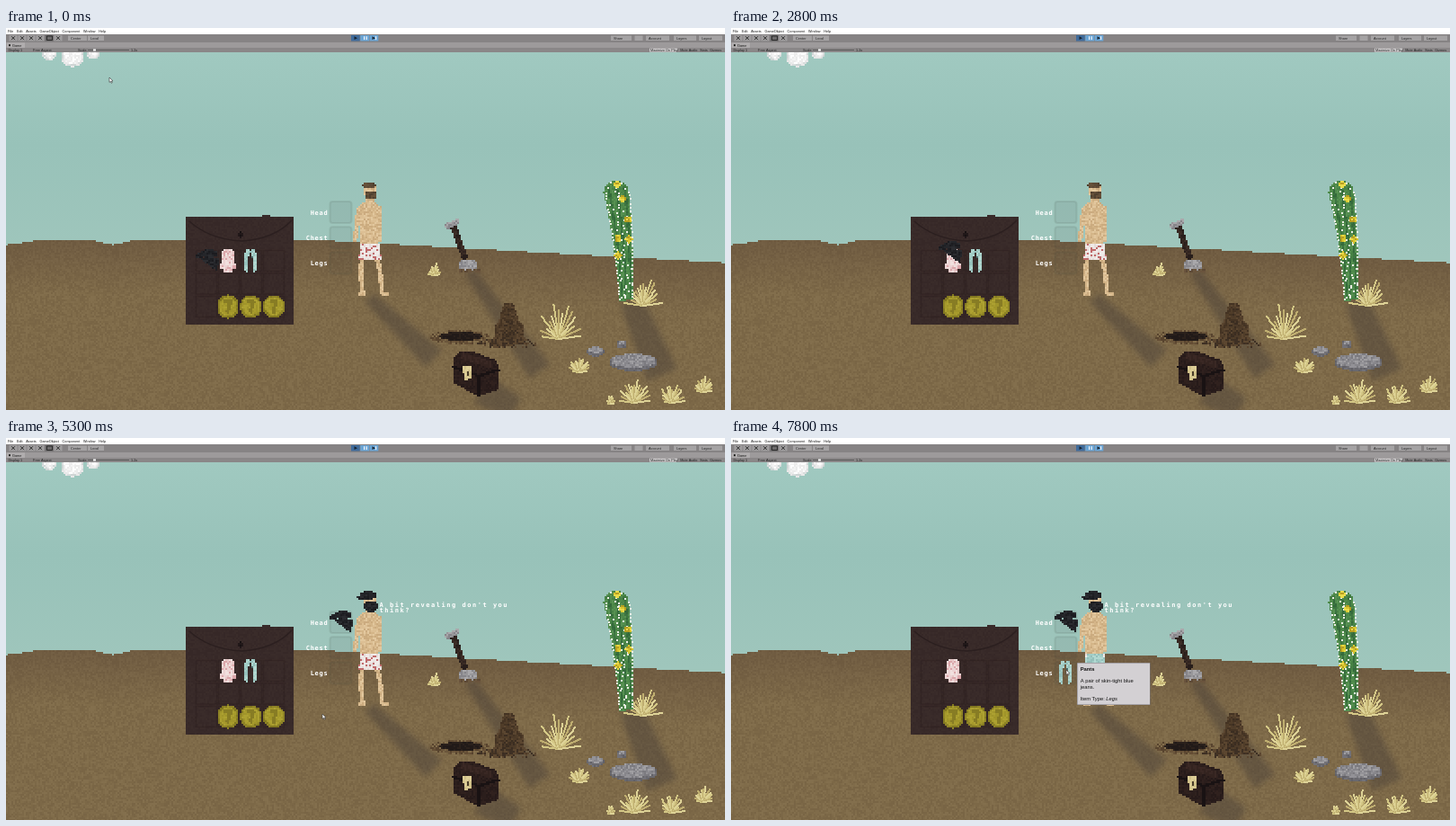
Animation, 800 px wide and 425 px high, one loop 8 s. Source, as an HTML page with a canvas:

```html
<!DOCTYPE html>
<html lang="en">
<head>
<meta charset="utf-8">
<title>Desert inventory</title>
<style>
html, body { margin: 0; width: 100%; height: 100%; overflow: hidden; background: #7e6a49; }
canvas { display: block; width: 100vw; height: 100vh; }
</style>
</head>
<body>
<canvas id="stage" width="800" height="425"></canvas>
<script>
const W = 800, H = 425, LOOP = 8000;
const SANS = '"Liberation Sans", Arial, sans-serif';
const MONO = '"DejaVu Sans Mono", monospace';
const stage = document.getElementById('stage').getContext('2d');

let seed = 7;
const rnd = () => (seed = (seed * 16807) % 2147483647) / 2147483647;
const pick = list => list[Math.floor(rnd() * list.length)];

function picture(paint, w = W, h = H) {
  const canvas = document.createElement('canvas');
  canvas.width = w;
  canvas.height = h;
  paint(canvas.getContext('2d'));
  return canvas;
}

function rect(c, color, x, y, w, h) {
  c.fillStyle = color;
  c.fillRect(x, y, w, h);
}

function text(c, str, x, y, font, color, align = 'left', spacing = 0) {
  c.font = font;
  c.fillStyle = color;
  c.textAlign = align;
  c.letterSpacing = spacing + 'px';
  c.fillText(str, x, y);
}

function oval(x, y, a, b) {
  const p = a * 0.55, q = b * 0.55;
  return `M${x - a} ${y}C${x - a} ${y - q} ${x - p} ${y - b} ${x} ${y - b}` +
    `C${x + p} ${y - b} ${x + a} ${y - q} ${x + a} ${y}` +
    `C${x + a} ${y + q} ${x + p} ${y + b} ${x} ${y + b}` +
    `C${x - p} ${y + b} ${x - a} ${y + q} ${x - a} ${y}Z`;
}

// A tapered strip between two points, bowed sideways by bend.
function band(x0, y0, x1, y1, w0, w1 = w0, bend = 0) {
  const len = Math.hypot(x1 - x0, y1 - y0), nx = (y0 - y1) / len, ny = (x1 - x0) / len;
  const at = (x, y, off) => `${(x + nx * off).toFixed(1)} ${(y + ny * off).toFixed(1)}`;
  const mid = off => at((x0 + x1) / 2, (y0 + y1) / 2, bend * 2 + off);
  const w = (w0 + w1) / 4;
  return `M${at(x0, y0, w0 / 2)}Q${mid(w)} ${at(x1, y1, w1 / 2)}` +
    `L${at(x1, y1, -w1 / 2)}Q${mid(-w)} ${at(x0, y0, -w0 / 2)}Z`;
}

// Fills a path with square cells of randomly chosen shades.
function art(c, path, shades, density = 1) {
  const cell = 2, tones = shades.split(' '), shape = new Path2D(path);
  const nums = path.match(/-?[\d.]+/g).map(Number);
  const xs = nums.filter((_, i) => i % 2 === 0), ys = nums.filter((_, i) => i % 2);
  const snap = v => Math.floor(v / cell) * cell;
  for (let y = snap(Math.min(...ys)); y < Math.max(...ys); y += cell)
    for (let x = snap(Math.min(...xs)); x < Math.max(...xs); x += cell)
      if (c.isPointInPath(shape, x + 1, y + 1) && rnd() < density)
        rect(c, pick(tones), x, y, cell, cell);
}

const SKIN = '#dcbf94 #d4b588 #e2c79e #cbab7f';
const DARK = '#1f2024 #25262a #1b1b1f #2b2c30';
const DENIM = '#a2cdc6 #b2d8d1 #94bfba';
const HAIR = '#5b4936 #665039 #50402f';
const STEEL = '#98979a #a9a8ab #86858a';
const SOIL = '#503d29 #5b4630 #443323';
const WOOD = '#2b1e1c #30211e #261a19';

function drawSky(c) {
  const g = c.createLinearGradient(0, 27, 0, 255);
  g.addColorStop(0, '#a0c9c0');
  g.addColorStop(.45, '#98c2b9');
  g.addColorStop(1, '#9fc6bc');
  rect(c, g, 0, 0, W, H);
  for (const [x, r] of [[48, 8], [74, 13], [97, 7]]) {
    art(c, oval(x, 25 + r * .5, r, r * .9), '#d9dddd #e8e8e8 #cfd5d5');
    art(c, oval(x, 24 + r * .5, r - 2, r * .9 - 2), '#f4f4f4 #ffffff #ececec');
  }
}

function horizon(x) {
  const bump = (at, width) => Math.exp(-(((x - at) / width) ** 2));
  return 235 + 6 * bump(0, 28) + 6 * bump(118, 18) + Math.max(0, x - 330) * .056;
}

function drawGround(c) {
  const tones = ['#806c4a', '#7c6847', '#836f4d', '#796545'];
  for (let x = 0; x < W; x += 2) {
    const top = Math.round(horizon(x) / 2) * 2;
    for (let y = top; y < H; y += 2) rect(c, pick(tones), x, y, 2, 2);
    const g = c.createLinearGradient(0, top, 0, top + 60);
    g.addColorStop(0, 'rgba(85,65,52,.35)');
    g.addColorStop(1, 'rgba(85,65,52,0)');
    rect(c, g, x, top, 2, 60);
  }
  c.filter = 'blur(3px)';
  c.fillStyle = 'rgba(72,62,56,.45)';
  for (const p of [
    band(404, 300, 476, 368, 14, 26),
    band(516, 271, 594, 382, 12, 28),
    band(696, 304, 730, 386, 26, 36),
    band(530, 402, 566, 424, 34, 28)
  ]) c.fill(new Path2D(p));
  c.filter = 'none';
}

function tuft(c, x, y, r) {
  for (let i = 0; i < 15; i++) {
    const a = Math.PI * (1.03 + i / 14 * .94), len = r * (.55 + rnd() * .45);
    c.fillStyle = ['#d4c886', '#bfae70', '#ded397'][i % 3];
    for (let d = 0; d < len; d += 1.7)
      c.fillRect(Math.round(x + Math.cos(a) * d * .68), Math.round(y + Math.sin(a) * d), 2, 2);
  }
}

function drawCactus(c) {
  art(c, oval(679, 183, 14, 13), '#4f8a4b #478245 #579152');
  art(c, band(679, 182, 690, 303, 28, 14, -2), '#4f8a4b #478245 #579152');
  for (const side of [-.5, 0, .5])
    art(c, band(679 + side * 18, 176, 690 + side * 9, 300, 3, 2, -2), '#346a3b #3d7541');
  for (let k = 0; k < 1; k += .035) {
    const mid = 679 + 11 * k + 8 * k * (1 - k), half = (14 - 7 * k) * Math.min(1, .45 + k * 7);
    for (const u of [-1, rnd() - .8, rnd() - .2, 1])
      rect(c, '#eceee4', Math.round(mid + u * half - 1), Math.round(171 + k * 130 + rnd() * 3), 2, 2);
  }
  for (const [x, y] of [[680, 174], [686, 190], [692, 213], [681, 234], [681, 253], [693, 235]])
    art(c, oval(x, y, 4, 4), '#d8c52c #eadb4a #b79f22');
}

function drawChest(c) {
  art(c, 'M497 368L505 360 516 359 544 369 549 378 548 402 526 410 498 395Z', WOOD);
  art(c, band(507, 364, 540, 375, 7), '#3a2824 #33231f');
  for (const p of [band(497, 377, 526, 387, 3), band(526, 387, 549, 380, 3), band(526, 387, 526, 409, 3)])
    art(c, p, '#191213');
  art(c, band(513, 376, 514, 391, 9), '#cfc088 #dccd96');
  rect(c, '#4a3d2a', 513, 382, 2, 5);
}

function drawProps(c) {
  art(c, band(498, 221, 511, 257, 7), '#30241f #3b2c25 #281e1b');
  art(c, band(489, 221, 504, 215, 7, 6), STEEL);
  art(c, oval(514, 264, 11, 7), STEEL);
  art(c, band(504, 271, 528, 269, 4), '#5d4936 #6a543d', .7);

  art(c, oval(505, 344, 33, 8), '#57432e #654e35 #6b563b', .7);
  art(c, oval(506, 343, 24, 5), '#211a18 #2b211c');
  art(c, band(559, 306, 560, 353, 10, 40, 0), SOIL);
  art(c, oval(560, 338, 17, 16), SOIL);
  art(c, band(561, 313, 561, 352, 4, 22), '#3b2d21 #4c3a28', .5);
  art(c, oval(558, 351, 33, 6), '#3e3024 #5c4730', .6);
  drawChest(c);

  for (const [x, y, a] of [[656, 359, 10], [685, 351, 6], [698, 371, 27]]) {
    const b = 3 + a * .25;
    art(c, oval(x, y + 1, a, b), '#6a696e #737278 #626167');
    art(c, oval(x, y - 1, a - 2, b - 2), '#87868b #939297 #7c7b80 #a09fa2');
  }

  tuft(c, 708, 308, 31);
  drawCactus(c);
  for (const [x, y, r] of [[476, 274, 14], [614, 345, 40], [637, 382, 18], [698, 416, 29], [740, 416, 23], [775, 404, 18], [672, 417, 9]])
    tuft(c, x, y, r);
}

function drawBag(c) {
  art(c, band(260, 210, 260, 329, 119, 121), '#382a29 #3a2c2a #362827');
  rect(c, '#382a29', 285, 208, 9, 3);
  c.strokeStyle = '#2b1f1f';
  c.lineWidth = 1.5;
  c.stroke(new Path2D('M204 215Q226 235 262 237Q298 235 318 214'));
  c.strokeStyle = 'rgba(22,14,15,.18)';
  for (let i = 0; i < 12; i++)
    c.strokeRect(211.5 + i % 4 * 25, 247.5 + Math.floor(i / 4) * 25.5, 23, 23);
  art(c, oval(261, 230, 3, 4), '#171112 #211819');
  for (const x of [247, 272.5, 298]) {
    art(c, oval(x, 310, 12, 13), '#827820 #8f8426');
    art(c, oval(x, 309.5, 10, 10.5), '#a79b2c #ada131 #a0942a');
    art(c, band(x - 4, 304, x + 4, 304, 4), '#877c24');
    art(c, band(x + 3, 304, x - 1, 317, 4), '#877c24');
  }
}

function drawSlots(c) {
  ['Head', 'Chest', 'Legs'].forEach((name, i) => {
    const dy = i * 28.3;
    c.beginPath();
    c.roundRect(360.5, 193 + dy, 24, 24, 3);
    c.fillStyle = 'rgba(60,70,65,.08)';
    c.fill();
    c.lineWidth = 2;
    c.strokeStyle = 'rgba(60,70,65,.11)';
    c.stroke();
    text(c, name, 358.5, 207.6 + dy, `bold 7px ${MONO}`, '#fff', 'right', .75);
  });
}

function drawEditor(c) {
  const row = (labels, x, y, gap, color = '#222') => {
    for (const s of labels) {
      text(c, s, x, y, `3.8px ${SANS}`, color);
      x += c.measureText(s).width + gap;
    }
  };
  const button = (s, x, w) => {
    rect(c, '#a5a3a4', x, 8.5, w, 5.5);
    row([s], x + 3, 12.8, 0);
  };
  rect(c, '#fff', 0, 0, W, 7);
  rect(c, '#868384', 0, 7, W, 9);
  rect(c, '#9d9a9b', 0, 16, W, 6);
  rect(c, '#8a8788', 0, 22, W, 5);
  row(['File', 'Edit', 'Assets', 'GameObject', 'Component', 'Window', 'Help'], 2, 4.5, 3.8, '#111');

  c.strokeStyle = '#222';
  c.lineWidth = .9;
  for (let x = 8; x < 60; x += 10) {
    rect(c, x === 48 ? '#6b696a' : '#a09e9f', x - 4.5, 8, 9, 6.5);
    c.stroke(new Path2D(x === 48 ? 'M45.5 9H51.5V13.5H45.5Z' : `M${x - 2} 9.2l4 4m0 -4l-4 4`));
  }
  button('Center', 69, 21);
  button('Local', 91, 18);

  ['#3f6b9b', '#6aa5d6', '#6aa5d6'].forEach((color, i) => rect(c, color, 384 + i * 10.3, 8, 9.7, 6.5));
  c.fillStyle = '#17222e';
  c.fill(new Path2D('M387.5 9.3l3.5 1.9l-3.5 1.9ZM407.5 9.3l3.5 1.9l-3.5 1.9Z'));
  for (const x of [398, 400.6, 411]) rect(c, '#f2f6fa', x, 9.3, 1.2, 3.8);

  button('Share', 673, 23);
  button('', 699.5, 9);
  button('Account', 712, 26);
  button('Layers', 743, 25);
  button('Layout', 771, 26);

  rect(c, '#b0adae', 1, 16.3, 20, 5.7);
  rect(c, '#222', 3, 18.2, 2, 2);
  row(['Game'], 7, 20.6, 0, '#111');
  row(['Display 1', 'Free Aspect'], 2.5, 25.6, 12);
  row(['Scale'], 80, 25.6, 0);
  row(['1.2x'], 139, 25.6, 0);
  rect(c, '#444', 91, 24.2, 46, .7);
  rect(c, '#ddd', 97, 23.2, 3, 2.6);
  rect(c, '#cfcdce', 716, 22.6, 31, 4);
  row(['Maximize On Play', 'Mute Audio', 'Stats', 'Gizmos'], 717, 25.6, 2.6);
}

function legs(c, shades, w) {
  art(c, band(397, 254, 397, 293, w, 4, 2), shades);
  art(c, band(412, 254, 417, 293, w, 4, -2), shades);
}

function drawMan(c) {
  legs(c, SKIN, 6);
  art(c, band(392, 296, 399, 295, 4), SKIN);
  art(c, band(416, 294, 425, 297, 4), SKIN);
  art(c, band(393, 200, 388, 238, 6, 5), SKIN);
  art(c, band(415, 198, 417, 237, 5, 4), SKIN);
  art(c, oval(404, 200, 12, 7), SKIN);
  art(c, band(404, 199, 404, 244, 24, 19), SKIN);
  art(c, band(405, 186, 405, 196, 8), SKIN);
  art(c, band(405, 241, 405, 257, 20, 26), '#f1ebe9 #e5dbd9 #efe8e6 #c06a6b');
  art(c, oval(405, 181, 7, 9), SKIN);
  art(c, oval(404, 175, 7, 4), HAIR);
  art(c, oval(406, 186, 7, 5), HAIR);
}

function drawWornMask(c) {
  art(c, band(391, 178, 400, 176, 5), DARK);
  art(c, oval(403, 175, 9, 5), DARK);
  art(c, oval(406, 187, 8, 7), DARK);
  art(c, band(403, 181, 412, 180, 3), SKIN);
}

function drawWornPants(c) {
  art(c, band(405, 241, 405, 257, 19, 26), DENIM);
  legs(c, DENIM, 8);
}

const sprite = paint => picture(paint, 26, 26);
const items = {
  mask: sprite(c => {
    art(c, band(0, 8, 10, 6, 5), DARK);
    art(c, oval(15, 5, 9, 5), DARK);
    art(c, band(6, 11, 25, 17, 2, 14), DARK);
  }),
  shirt: sprite(c => {
    const cloth = '#ecd3d3 #e6c6c6 #f1e0de #dba6aa';
    art(c, band(9, 2, 6, 22, 4), cloth);
    art(c, band(17, 2, 20, 22, 4), cloth);
    art(c, band(13, 0, 13, 26, 9, 10), cloth);
  }),
  pants: sprite(c => {
    art(c, band(15, 4, 16, 24, 4, 2, -2), '#4a6b6b #6d9390');
    art(c, band(11, 1, 8, 25, 6, 3, 2), DENIM);
    art(c, band(15, 1, 18, 25, 6, 3, -2), DENIM);
  })
};

const scene = picture(c => [drawSky, drawGround, drawProps, drawBag, drawSlots, drawEditor].forEach(draw => draw(c)));
const man = picture(drawMan), wornMask = picture(drawWornMask), wornPants = picture(drawWornPants);

const TIPS = {
  mask: ['Bandit Mask', 'A bad mask for a bad', 'individual.', 'Head'],
  pants: ['Pants', 'A pair of skin-tight blue', 'jeans.', 'Legs']
};

function tooltip(c, [title, line1, line2, type], x, y) {
  const put = (s, dx, dy, style = '') => text(c, s, x + dx, y + dy, `${style} 5.8px ${SANS}`, '#111');
  rect(c, '#77757a', x - .5, y - .5, 81.5, 47);
  rect(c, '#d3d0d3', x, y, 80.5, 46);
  put(title, 3.2, 8.6, 'bold');
  put(line1, 3.2, 21.8);
  put(line2, 3.2, 28.2);
  put('Item Type: ', 3.2, 41.4);
  put(type, 3.2 + c.measureText('Item Type: ').width, 41.4, 'italic');
}

// Pointer moves: start, end, x, y; it rests in between.
const MOVES = [[400, 1300, 222, 256], [1600, 1800, 224, 249], [2200, 2300, 223, 258], [2700, 3400, 370.5, 205],
  [4700, 4900, 382, 307], [5100, 5300, 352, 307], [5500, 5900, 282, 253], [6000, 6400, 272, 258],
  [6700, 7500, 372, 261], [7700, 7800, 373, 258]];

function pointer(t) {
  let x = 115, y = 55;
  for (const [from, to, x1, y1] of MOVES) {
    const k = Math.min(1, Math.max(0, (t - from) / (to - from)));
    x += (x1 - x) * k;
    y += (y1 - y) * k;
  }
  return [x, y];
}

function arrow(c, x, y) {
  const p = new Path2D(`M${x} ${y}l0 5.4l1.3 -1.1l1 2l.9 -.4l-.9 -1.9l1.7 -.1Z`);
  c.fillStyle = '#fff';
  c.strokeStyle = '#333';
  c.lineWidth = .6;
  c.fill(p);
  c.stroke(p);
}

function render(t) {
  const c = stage, during = (a, b = LOOP) => t >= a && t < b;
  const [x, y] = pointer(t);
  const item = (name, cx, cy) => c.drawImage(items[name], Math.round(cx - 13), Math.round(cy - 13));

  c.drawImage(scene, 0, 0);
  item('shirt', 247, 259);
  if (during(0, 2800)) item('mask', 224, 259);
  if (during(3900)) item('mask', 373, 205);
  if (during(0, 6800)) item('pants', 272, 259);
  if (during(7800)) item('pants', 372, 261);

  c.drawImage(man, 0, 0);
  if (during(3900)) c.drawImage(wornMask, 0, 0);
  if (during(7800)) c.drawImage(wornPants, 0, 0);
  if (during(3900, 6800) || during(7800))
    ["A bit revealing don't you", 'think?'].forEach((line, i) =>
      text(c, line, 415.5, 187.8 + i * 6, `bold 7px ${MONO}`, '#fff', 'left', 1.53));

  if (during(1400, 2800)) tooltip(c, TIPS.mask, 235, 247.5);
  if (during(3900, 4800)) tooltip(c, TIPS.mask, 385.5, 194);
  if (during(5800, 6800)) tooltip(c, TIPS.pants, 286, 247.5);
  if (during(7800)) tooltip(c, TIPS.pants, 385.5, 250.5);

  if (during(2800, 3900)) item('mask', x, y);
  else if (during(6800, 7800)) item('pants', x, y);
  else arrow(c, x, y);
}

const start = performance.now();
function tick() {
  const t = (performance.now() - start) % LOOP;
  render(Math.floor(t / 100) * 100);
  requestAnimationFrame(tick);
}
tick();
</script>
</body>
</html>
```
